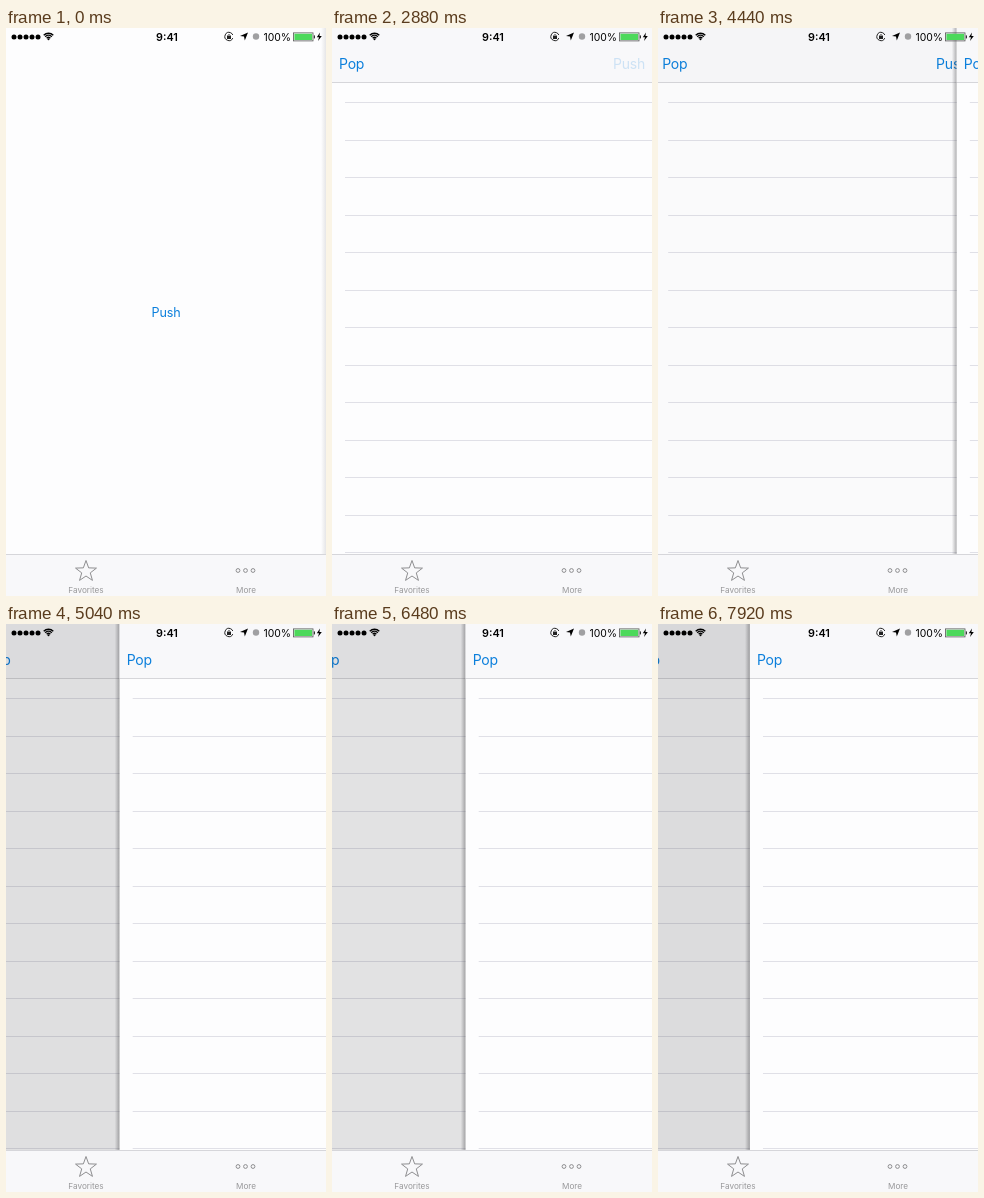
These frames come from a looping animation (320x568 px, 8 s). An HTML page with a canvas:

```html
<!DOCTYPE html>
<html lang="en">
<head>
<meta charset="utf-8">
<title>Navigation push and swipe back</title>
<style>
html, body { margin: 0; width: 100%; height: 100%; overflow: hidden; background: #fdfdfe; }
canvas { display: block; width: 320px; height: 568px; }
</style>
</head>
<body>
<canvas id="stage" width="320" height="568"></canvas>
<script>
const c = document.getElementById('stage').getContext('2d');
const W = 320, H = 568, TAB = 526, LOOP = 8000, STEP = 120;
const PAPER = '#fdfdfe', BAR = '#f8f8fa', LINE = '#e0e0e7', BLUE = '#0b7fdc', GREY = '#8e8e90';
const PRESS_1 = 1440, PUSH_1 = 1592, PRESS_2 = 2880, PUSH_2 = 2960;

// Two swipes, out and back, as [time, page edge]
const drag = [[3640, 0], [4075, 290], [4540, 300], [5400, 0], [5700, 0], [7400, 305], [8218, 0]];

function spring(t) {
  const k = Math.max(0, t) * 0.014;
  return 1 - (1 + k) * Math.exp(-k);
}

function pageEdge(t) {
  let x;
  if (t < drag[0][0]) x = W * (1 - spring(t - (t < PRESS_2 ? PUSH_1 : PUSH_2)));
  else {
    const i = drag.findIndex(p => p[0] > t);
    const [t0, a] = drag[i - 1], [t1, b] = drag[i];
    const u = (t - t0) / (t1 - t0);
    x = a + (b - a) * u * u * (3 - 2 * u);
  }
  return x < 0.6 ? 0 : x;
}

function rect(x, y, w, h, color) {
  c.fillStyle = color;
  c.fillRect(x, y, w, h);
}

function text(str, x, y, size, color, align = 'left', weight = 400) {
  c.font = `${weight} ${size}px Inter, sans-serif`;
  c.letterSpacing = size > 12 ? '-0.2px' : '0px';
  c.textAlign = align;
  c.fillStyle = color;
  c.fillText(str, x, y);
}

function disc(x, y, r, color) {
  c.fillStyle = color;
  c.beginPath();
  c.arc(x, y, r, 0, 7);
  c.fill();
}

function arc(x, y, r, from, to, color, width) {
  c.strokeStyle = color;
  c.lineWidth = width;
  c.beginPath();
  c.arc(x, y, r, from, to);
  c.stroke();
}

function shape(points, color) {
  c.beginPath();
  points.forEach(([x, y]) => c.lineTo(x, y));
  c.closePath();
  c.fillStyle = color;
  c.fill();
}

function faded(alpha, paint) {
  c.globalAlpha = alpha;
  paint();
  c.globalAlpha = 1;
}

function rootPage(x, pushAlpha) {
  rect(x, 0, W * 1.2, H, PAPER);
  faded(pushAlpha, () => text('Push', x + 160, 289, 12.6, BLUE, 'center'));
}

function listPage(x, pushAlpha) {
  rect(x, 0, W * 1.2, H, PAPER);
  rect(x, 0, W * 1.2, 54, BAR);
  rect(x, 54, W * 1.2, 1, '#d6d6da');
  for (let i = 0; i < 13; i++) rect(x + 13, Math.floor(74.5 + i * 37.5), W * 1.2, 1, LINE);
  text('Pop', x + 7, 41, 14, BLUE);
  faded(pushAlpha, () => text('Push', x + 313, 41, 14, BLUE, 'right'));
}

function shadow(edge, alpha) {
  const g = c.createLinearGradient(edge - 5, 0, edge, 0);
  g.addColorStop(0, 'rgba(60,60,64,0)');
  g.addColorStop(1, `rgba(60,60,64,${alpha})`);
  rect(edge - 5, 0, 5, H, g);
}

function statusBar() {
  for (let i = 0; i < 5; i++) disc(8 + i * 6, 9, 2.5, '#000');
  for (const r of [2.6, 4.7, 6.8]) arc(42.5, 12, r, -2.35, -0.79, '#000', 1.4);
  disc(42.5, 11.3, 1, '#000');
  text('9:41', 161, 12.5, 10.8, '#000', 'center', 600);

  arc(223, 8.5, 4.1, 0.4, 5.9, '#222', 1);
  rect(221, 8, 4, 3, '#222');
  arc(223, 8, 1.3, Math.PI, 0, '#222', 0.8);
  shape([[242, 4.5], [238.8, 12.5], [238, 8.6], [234, 8]], '#000');
  disc(250, 8.5, 3.2, '#a0a0a2');

  text('100%', 285, 12.5, 10.4, '#000', 'right');
  c.strokeStyle = '#555';
  c.lineWidth = 0.8;
  c.strokeRect(287.5, 4.9, 19.5, 8);
  rect(288.4, 5.8, 17.7, 6.2, '#4cd95b');
  rect(307.8, 7.4, 1.2, 3, '#333');
  shape([[314, 4.5], [310.8, 9.3], [313, 9.3], [312, 13], [315.8, 7.9], [313.4, 7.9]], '#000');
}

function tabBar() {
  rect(0, TAB, W, H - TAB, BAR);
  rect(0, TAB, W, 1, '#d6d6da');
  c.beginPath();
  for (let i = 0; i < 10; i++) {
    const r = i % 2 ? 4.5 : 11, a = i * Math.PI / 5;
    c.lineTo(80 + r * Math.sin(a), 543.5 - r * Math.cos(a));
  }
  c.closePath();
  c.strokeStyle = GREY;
  c.lineWidth = 1;
  c.stroke();
  for (const x of [232, 239.5, 247]) arc(x, 542.5, 1.9, 0, 7, GREY, 1);
  text('Favorites', 80, 565, 8.2, '#98989a', 'center');
  text('More', 240, 565, 8.2, '#98989a', 'center');
}

function draw(t) {
  const edge = pageEdge(t), back = (edge - W) * 0.1333;
  const first = t < PRESS_2;
  if (edge > 0) {
    if (first) rootPage(back, t < PRESS_1 ? 1 : 0.35);
    else listPage(back, t < drag[0][0] ? 0.18 : 1);
    rect(0, 0, edge, H, `rgba(0,0,0,${0.18 * (1 - edge / W)})`);
    if (edge < W) shadow(edge, 0.4);
    else if (first) shadow(W, 0.12);
  }
  if (edge < W) listPage(edge, 1);
  tabBar();
  statusBar();
}

function tick() {
  const t = performance.now() % LOOP;
  draw(Math.floor(t / STEP) * STEP);
  requestAnimationFrame(tick);
}
tick();
</script>
</body>
</html>
```
